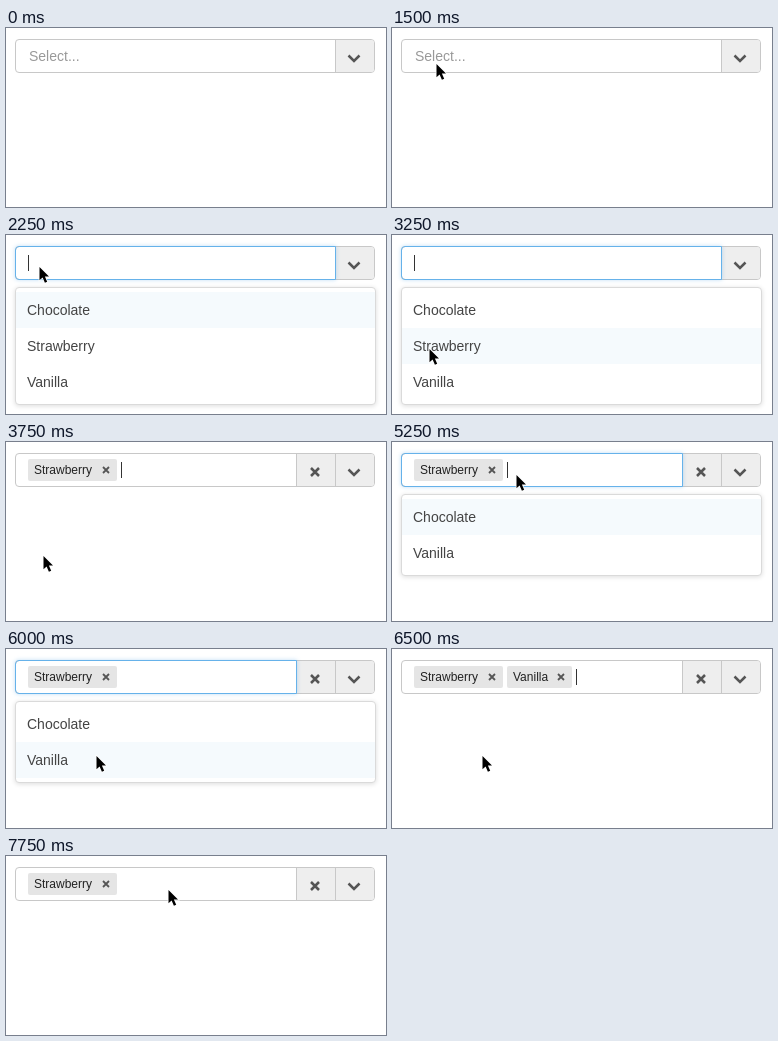
Write an HTML page that moves like this. It is 380 px wide and 179 px high and loops after 8 s.

```html
<!DOCTYPE html>
<html lang="en">
<head>
<meta charset="utf-8">
<title>Multi select</title>
<style>
  html, body { margin: 0; width: 100%; height: 100%; overflow: hidden; background: #fff; }
  .stage { position: relative; width: 380px; height: 179px; overflow: hidden; font: 14px "Liberation Sans", Arial, sans-serif; }
  .stage *, .stage { box-sizing: border-box; }
  .stage div:not(.item), svg { position: absolute; }

  /* every state is held, so all timelines jump */
  .t { animation: 8s step-end -10ms infinite; }

  .control { left: 9px; top: 11px; width: 360px; height: 34px; border: 1px solid #c8c8c8; border-radius: 4px; }
  .button { top: 12px; width: 40px; height: 32px; background: #eee; border-left: 1px solid #c8c8c8; }
  .open { left: 329px; width: 39px; border-radius: 0 3px 3px 0; }
  .clear { left: 290px; width: 39px; animation-name: clear; }
  .focus { left: 9px; top: 11px; height: 34px; border: 1px solid #66b2ea; border-radius: 4px 0 0 4px; box-shadow: 0 0 4px rgba(102,175,233,.4); animation-name: focus; }
  .hint { left: 23px; top: 11px; line-height: 34px; color: #999; animation-name: hint; }

  .tag { top: 17px; height: 22px; padding-left: 6px; border-radius: 2px; background: #e5e5e5; color: #222; font-size: 12px; line-height: 22px; }
  .tag svg { right: 7px; top: 7px; }
  .first { left: 22px; width: 89px; animation-name: clear; }
  .second { left: 115px; width: 65px; animation-name: second; }
  .caret { left: 0; top: 20px; width: 1px; height: 16px; background: #333; animation-name: caret; }

  .menu { left: 9px; top: 52px; width: 361px; padding: 4px 0; background: #fff; border: 1px solid #dadada; border-radius: 4px; box-shadow: 0 1px 5px rgba(0,0,0,.14); color: #444; }
  .item { position: relative; height: 36px; padding-left: 11px; line-height: 36px; }
  .hover { left: 0; top: 4px; width: 100%; height: 36px; background: #f5fafd; }
  .three { animation-name: three; }
  .three .hover { animation-name: hover3; }
  .two { animation-name: two; }
  .two .hover { animation-name: hover2; }

  .icon { fill: none; stroke: #555; }
  .pointer { left: 0; top: 0; overflow: visible; animation-name: pointer; }

  @keyframes hint { 0% { visibility: visible } 28.125%, 100% { visibility: hidden } }
  @keyframes clear { 0% { visibility: hidden } 46.875%, 100% { visibility: visible } }
  @keyframes second { 0%, 96.875%, 100% { visibility: hidden } 78.125% { visibility: visible } }
  @keyframes three { 0%, 46.875%, 100% { visibility: hidden } 28.125% { visibility: visible } }
  @keyframes two { 0%, 78.125%, 100% { visibility: hidden } 65.625% { visibility: visible } }
  @keyframes hover3 { 0% { transform: none } 37.5%, 100% { transform: translateY(36px) } }
  @keyframes hover2 { 0% { transform: none } 75%, 100% { transform: translateY(36px) } }
  @keyframes focus {
    0%, 46.875%, 78.125%, 100% { visibility: hidden; width: 282px }
    28.125% { visibility: visible; width: 321px }
    65.625% { visibility: visible; width: 282px }
  }
  @keyframes caret {
    0%, 34.375%, 50%, 62.5%, 71.875%, 84.375%, 96.875%, 100% { opacity: 0; transform: none }
    28.125%, 40.625% { opacity: 1; transform: translateX(22px) }
    46.875%, 56.25%, 65.625% { opacity: 1; transform: translateX(115px) }
    78.125%, 90.625% { opacity: 1; transform: translateX(184px) }
  }
  @keyframes pointer {
    0%, 100% { transform: translate(-30px, -30px) }
    12.5% { transform: translate(61px, 50px) }
    15.625% { transform: translate(54px, 44px) }
    18.75% { transform: translate(44px, 36px) }
    21.875% { transform: translate(36px, 31px) }
    25%, 28.125% { transform: translate(33px, 32px) }
    34.375% { transform: translate(35px, 58px) }
    37.5% { transform: translate(37px, 98px) }
    40.625%, 46.875%, 50% { transform: translate(37px, 114px) }
    53.125% { transform: translate(46px, 112px) }
    56.25% { transform: translate(63px, 107px) }
    59.375% { transform: translate(98px, 66px) }
    62.5%, 65.625% { transform: translate(124px, 33px) }
    71.875% { transform: translate(112px, 66px) }
    75%, 78.125%, 81.25% { transform: translate(90px, 107px) }
    84.375% { transform: translate(103px, 82px) }
    87.5% { transform: translate(132px, 54px) }
    90.625% { transform: translate(156px, 38px) }
    93.75%, 96.875% { transform: translate(162px, 34px) }
  }
</style>
</head>
<body>
<div class="stage">
  <div class="control"></div>
  <div class="button open"></div>
  <div class="button clear t">
    <svg class="icon" style="left:13px;top:13px" width="10" height="10" stroke-width="2.5"><path d="M1 1 9 9M9 1 1 9"/></svg>
  </div>
  <svg class="icon" style="left:341px;top:25px" width="14" height="11" stroke-width="2.5"><path d="M1.5 2.5 7 8 12.5 2.5"/></svg>
  <div class="focus t"></div>
  <div class="hint t">Select...</div>

  <div class="tag first t">Strawberry<svg class="icon" width="8" height="8" stroke-width="1.8"><path d="M1 1 7 7M7 1 1 7"/></svg></div>
  <div class="tag second t">Vanilla<svg class="icon" width="8" height="8" stroke-width="1.8"><path d="M1 1 7 7M7 1 1 7"/></svg></div>
  <div class="caret t"></div>

  <div class="menu three t">
    <div class="hover t"></div>
    <div class="item">Chocolate</div>
    <div class="item">Strawberry</div>
    <div class="item">Vanilla</div>
  </div>
  <div class="menu two t">
    <div class="hover t"></div>
    <div class="item">Chocolate</div>
    <div class="item">Vanilla</div>
  </div>

  <svg class="pointer t" width="12" height="18">
    <path d="M.5 0V13.2L3.6 10.4 5.9 15.8 8.2 14.8 5.9 9.6H10Z" fill="#000" stroke="#fff" stroke-width="1.6" paint-order="stroke"/>
  </svg>
</div>
</body>
</html>
```
